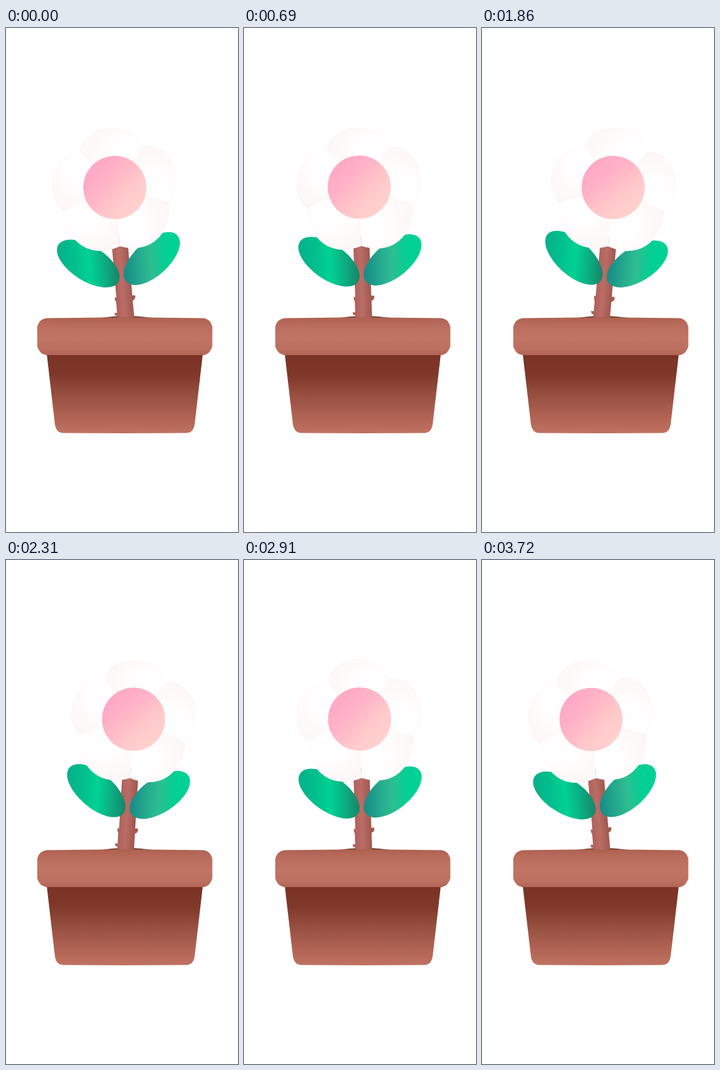
An HTML page with a canvas for the animation above (3.75 s loop, 375x812 px).

```html
<!DOCTYPE html>
<html lang="en">
<head>
<meta charset="utf-8">
<title>Swaying flower</title>
<style>
  html, body { margin: 0; width: 100%; height: 100%; overflow: hidden; background: #fff; }
  canvas { display: block; width: 375px; height: 812px; }
</style>
</head>
<body>
<canvas id="stage" width="375" height="812"></canvas>
<script>
const ctx = document.getElementById('stage').getContext('2d');
const LOOP = 3750, HALF_SWING = 1780, DELAY = 30;
const TILT = 5 * Math.PI / 180;
const PIVOT = { x: 194, y: 464 };

// Each petal: start, two control points, end; relative to the flower centre, clockwise.
const PETALS = [
  [-51, -63, -37, -108, 37, -108, 51, -63],
  [51, -63, 95, -68, 120, 0, 86, 31],
  [86, 31, 86, 75, 55, 114, 0, 95],
  [0, 95, -55, 114, -86, 75, -86, 31],
  [-86, 31, -120, 0, -95, -68, -51, -63]
];

function addStops(gradient, stops) {
  stops.forEach(([at, color]) => gradient.addColorStop(at, color));
  return gradient;
}

const linear = (x0, y0, x1, y1, ...stops) =>
  addStops(ctx.createLinearGradient(x0, y0, x1, y1), stops);

function fillPath(fill, d) {
  ctx.fillStyle = fill;
  ctx.fill(new Path2D(d));
}

function fillEllipse(fill, x, y, rx, ry, angle = 0) {
  ctx.fillStyle = fill;
  ctx.beginPath();
  ctx.ellipse(x, y, rx, ry, angle * Math.PI / 180, 0, 2 * Math.PI);
  ctx.fill();
}

// cubic-bezier(.42, 0, .58, 1)
function easeInOut(p) {
  let lo = 0, hi = 1;
  for (let i = 0; i < 24; i++) {
    const u = (lo + hi) / 2, v = 1 - u;
    const x = 3 * v * v * u * 0.42 + 3 * v * u * u * 0.58 + u * u * u;
    if (x < p) lo = u; else hi = u;
  }
  return lo * lo * (3 - 2 * lo);
}

function swayAngle(time) {
  const phase = Math.abs(time - DELAY) / HALF_SWING % 2;
  return TILT * (2 * easeInOut(phase > 1 ? 2 - phase : phase) - 1);
}

function drawPot() {
  fillPath(linear(0, 527, 0, 653,
    [0, '#7a3324'], [0.24, '#7e3728'], [0.5, '#964e3f'], [0.78, '#b06353'], [1, '#c07262']),
    'M66 526H318L305 638Q303 652.5 291 652.5L192 653L93 652.5Q81 652.5 79 638Z');
  fillPath(linear(0, 467, 0, 527,
    [0, '#ae6151'], [0.2, '#ba6d5d'], [0.55, '#c07464'], [0.85, '#bc6f5f'], [1, '#b16455']),
    'M65 467.5L192 466L320 467.5Q330 469 333.5 481V513Q330 525 320 527H65Q54 525 50.5 513V481Q54 469 65 467.5Z');
}

function drawStem() {
  fillPath(linear(180, 0, 207, 0, [0, '#ae6059'], [0.45, '#ba6d66'], [1, '#a0584e']),
    'M181 330H207V432L211 431.5L212 434.5L210 438.5L207 440V467H180V462.5L177 462L175.5 457.5L180 457.5V440L178.5 437L178.5 432.5L181 433Z');
}

function drawLeaves() {
  fillEllipse(linear(91, 0, 190, 0,
    [0, '#06b088'], [0.28, '#02bf8d'], [0.52, '#00d294'], [0.75, '#0cae82'], [1, '#168468']),
    140.6, 374.5, 57, 28.3, 37);
  fillEllipse(linear(197, 0, 291, 0,
    [0, '#168b88'], [0.25, '#24a78d'], [0.48, '#2dbe91'], [0.75, '#02d094'], [1, '#00d294']),
    243.6, 375.4, 55.6, 28, -37);
}

function drawPetal([x0, y0, x1, y1, x2, y2, x3, y3]) {
  const fx = 0.6 * x3 + 0.15 * x0, fy = 0.6 * y3 + 0.15 * y0;
  const shade = addStops(ctx.createRadialGradient(fx, fy, 0, fx, fy, 92),
    [[0, '#fff'], [0.25, '#fffefe'], [0.65, '#fef9f9'], [1, '#fcf2f3']]);
  fillPath(shade, `M0 0L${x0} ${y0}C${x1} ${y1} ${x2} ${y2} ${x3} ${y3}Z`);
}

function drawFlower() {
  ctx.save();
  ctx.translate(194, 256.2);
  fillEllipse('#fff', 0, 0, 78, 78);
  PETALS.forEach(drawPetal);
  fillEllipse(linear(-36, -36, 32, 36, [0, '#ffa8c5'], [0.3, '#ffb1c6'], [0.75, '#ffcacb'], [1, '#ffd0ce']),
    0, 0, 51, 51);
  ctx.restore();
}

function draw(time) {
  ctx.fillStyle = '#fff';
  ctx.fillRect(0, 0, 375, 812);
  fillPath('#5b3322', 'M148 468Q194 460 242 468Z');
  ctx.save();
  ctx.translate(PIVOT.x, PIVOT.y);
  ctx.rotate(swayAngle(time));
  ctx.translate(-PIVOT.x, -PIVOT.y);
  drawStem();
  drawLeaves();
  drawFlower();
  ctx.restore();
  drawPot();
}

const start = performance.now();
function tick() {
  draw((performance.now() - start) % LOOP);
  requestAnimationFrame(tick);
}
tick();
</script>
</body>
</html>
```
